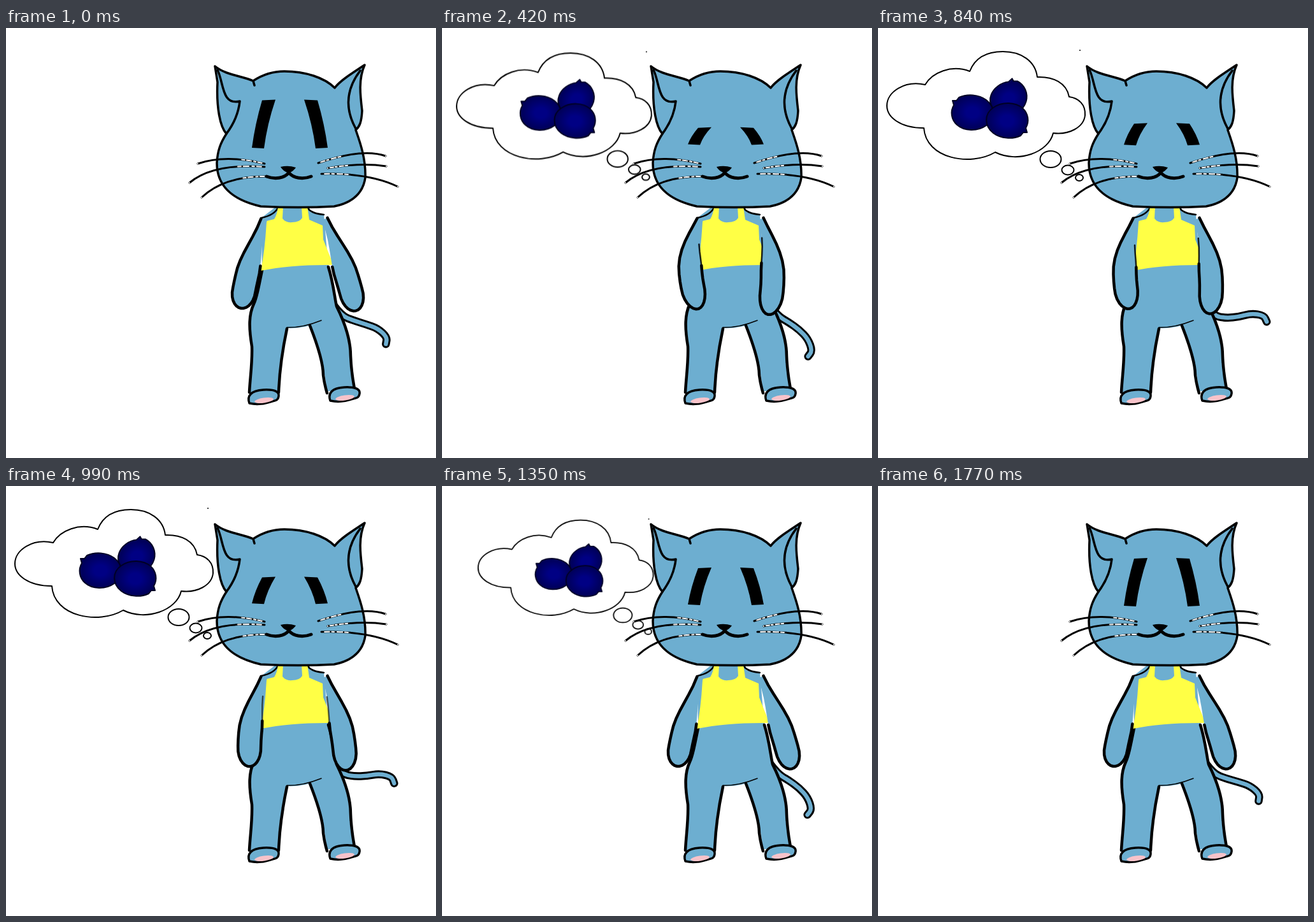
An HTML page that plays this animation: 675 px wide and 675 px high, repeating every 1800 ms.

```html
<!DOCTYPE html>
<html lang="en">
<head>
<meta charset="utf-8">
<title>Cat dreaming of berries</title>
<style>
  html, body { margin: 0; width: 100%; height: 100%; overflow: hidden; background: #fff; }
  svg { display: block; width: 100vw; height: 100vh; }
  path, ellipse { stroke-linecap: round; stroke-linejoin: round; }
  .fur { fill: #6daed0; }
  .line { fill: none; stroke: #000; stroke-width: 4.5; }
  .fine { stroke: #000; stroke-width: 3.5; }
  .thin { stroke-width: 2.5; }
  .cloud { fill: #fff; stroke: #000; stroke-width: 2; }
  .berry { fill: url(#navy); stroke: #000024; stroke-width: 2; }
  .gleam { fill: none; stroke: #fff; stroke-width: 2; stroke-dasharray: 0 66 4 3 7 4 3 3 6 4; }
  #bubble { transform-origin: 170px 122px; animation: think 1800ms linear infinite; }
  @keyframes think {
    0% { transform: translate(248px, 36px) scale(.35); }
    24%, 72.8% { transform: none; }
    92.2%, 100% { transform: translate(211px, 57px) scale(0); }
  }
</style>
</head>
<body>
<svg viewBox="0 0 675 675">
  <defs>
    <radialGradient id="navy">
      <stop offset=".3" stop-color="#000084"/>
      <stop offset="1" stop-color="#000056"/>
    </radialGradient>
    <path id="berry" d="M-29 -12L-31 -19L-25 -19L-21 -24C-8 -30 10 -29 22 -20C36 -9 37 10 22 20C8 30 -13 29 -24 19C-33 11 -35 -2 -29 -12Z"/>
    <g id="foot">
      <path class="fur fine" d="M382 589C378 578 384 569 404 568C424 567 429 572 428 578C427 584 424 585 418 586C405 590 395 592 382 589Z"/>
      <ellipse fill="#f8c3ca" cx="405" cy="584.5" rx="15" ry="4" transform="rotate(-8 405 584)"/>
    </g>
    <g id="whiskers">
      <path pathLength="100" d="M301 213Q345 198 406 213"/>
      <path pathLength="100" d="M288 243Q325 212 406 218"/>
      <path pathLength="100" d="M307 266Q343 232 410 233"/>
      <path pathLength="100" d="M596 201Q560 188 490 212"/>
      <path pathLength="100" d="M597 217Q555 211 505 220"/>
      <path pathLength="100" d="M615 249Q570 227 495 229"/>
    </g>
  </defs>

  <g id="bubble">
    <path class="cloud" d="M72 157C35 157 14 140 14 122C14 100 42 82 74 89C85 70 115 57 144 68C153 45 173 37 196 37C225 37 247 52 250 77C275 76 296 86 300 108C315 110 326 120 325 137C323 156 300 168 275 165C268 195 220 213 184 195C145 218 75 205 72 157Z"/>
    <ellipse class="cloud" cx="271" cy="206" rx="16.5" ry="13"/>
    <ellipse class="cloud" cx="298" cy="223" rx="9.5" ry="7.5"/>
    <ellipse class="cloud" cx="316" cy="235" rx="6" ry="5"/>
    <use href="#berry" class="berry" transform="translate(205 111) rotate(60) scale(.8 1.08)"/>
    <use href="#berry" class="berry" transform="translate(148 133)"/>
    <use href="#berry" class="berry" transform="translate(203 145) rotate(180)"/>
    <circle cx="317" cy="35" r="1"/>
  </g>

  <path id="tailEdge" class="line" style="stroke-width:12.5"/>
  <path id="tailFur" class="line" style="stroke:#6daed0;stroke-width:6.5"/>

  <!-- trunk and legs -->
  <path class="fur" d="M427 278H475L478 289L499 293L506 375C514 400 516 425 519 437C528 455 541 485 541 515C542 540 545 555 547 570H504C499 530 492 500 477 467Q460 472 441 471C434 505 429 545 428 574H382C383 550 387 525 386 500C381 470 381 450 389 433L402 380L401 298Z"/>
  <path class="line" d="M402 380C396 410 393 425 389 433C381 450 381 470 386 500C387 525 383 550 382 572M441 472C434 505 429 545 428 572M506 375C514 400 516 425 519 437C528 455 541 485 541 515C542 540 545 555 547 566M477 467C488 495 498 525 498 545Q500 560 504 573"/>
  <path class="line thin" d="M427 282Q421 294 401 298M474 283Q479 291 499 293"/>
  <path class="line" style="stroke-width:1.5" d="M441 470Q465 471 495 459"/>
  <use href="#foot"/>
  <use href="#foot" x="127" y="-4"/>

  <path fill="#ffff45" d="M427 280H435L434 299Q439 306 449 305Q461 305 465 298L464 280H473L476 301L497 310L498 332L514 372Q450 371 400 381Q407 345 409 303L421 300Q426 292 427 280Z"/>

  <g id="arms"></g>

  <!-- head -->
  <path class="fur fine" d="M388 83C403 73 420 68 437 68C470 68 500 78 516 94C525 82 545 70 563 58C553 80 556 105 559 130C558 148 555 155 549 160C556 180 565 205 564 235C560 262 540 275 515 280Q460 283 400 280C365 272 331 255 331 212C332 192 337 180 346 166C336 155 330 125 332 85L328 60C345 74 370 75 388 83Z"/>
  <path class="line fine" d="M388 83L390 90M332 66C342 85 338 122 367 115Q364 142 346 166M556 67C540 88 527 118 549 158"/>

  <use href="#whiskers" class="line fine" style="stroke-width:3"/>
  <use href="#whiskers" class="gleam"/>
  <path d="M431 218Q443 215 455 219Q452 224 444 228Q435 225 431 218Z"/>
  <path class="line" style="stroke-width:5" d="M409 233C422 238 437 236 444 227C451 236 466 238 479 233"/>
  <path id="eye"/>
  <use href="#eye" transform="translate(891) scale(-1 1)"/>
</svg>

<script>
const LOOP = 1800, DROWSY = 570, REACH = 585, WAG = 1175;
const $ = id => document.getElementById(id);
const mix = (a, b, k) => a + (b - a) * k;
const smooth = k => k * k * (3 - 2 * k);
const line = pts => 'M' + pts.join('L');

function add(parent, cls) {
  const path = document.createElementNS('http://www.w3.org/2000/svg', 'path');
  path.setAttribute('class', cls);
  parent.append(path);
  return path;
}

// a chain of links that bends more towards the tip
function drawTail(swing) {
  const rest = [53, 21, 17, 19, 43, 100];
  let x = 515, y = 436, d = `M${x} ${y}`;
  rest.forEach((deg, i) => {
    const a = (deg + swing * 35 * Math.min(1, i / 3)) * Math.PI / 180;
    const size = i < 5 ? 20 : 11;
    const nx = x + size * Math.cos(a), ny = y + size * Math.sin(a);
    d += i ? `Q${x} ${y} ${(x + nx) / 2} ${(y + ny) / 2}` : '';
    [x, y] = [nx, ny];
  });
  d += `L${x} ${y}`;
  $('tailEdge').setAttribute('d', d);
  $('tailFur').setAttribute('d', d);
}

// side: which way the outer edge faces; elbow and hand go from hanging to reaching
const arms = [
  { side: 1, shoulder: [405, 301], elbow: [[379, 387], [394, 377]], hand: [[369, 440], [416, 441]] },
  { side: -1, shoulder: [500, 300], elbow: [[534, 388], [513, 386]], hand: [[549, 444], [497, 452]] }
];
for (const arm of arms) {
  arm.fur = add($('arms'), 'fur');
  arm.inner = add($('arms'), 'line thin');
  arm.outer = add($('arms'), 'line');
}

function drawArm(arm, reach) {
  const STEPS = 16, BEND = .6;
  const S = arm.shoulder;
  const [E, H] = [arm.elbow, arm.hand].map(([a, b]) => a.map((v, j) => mix(v, b[j], reach)));
  // quadratic that passes through the elbow at BEND
  const C = E.map((v, j) => (v - (1 - BEND) ** 2 * S[j] - BEND ** 2 * H[j]) / (2 * BEND * (1 - BEND)));
  const edge = (i, side) => {
    const u = Math.sin(i / STEPS * Math.PI / 2);
    const [x, y] = S.map((v, j) => mix(mix(v, C[j], u), mix(C[j], H[j], u), u));
    const [dx, dy] = S.map((v, j) => mix(C[j] - v, H[j] - C[j], u));
    const tip = Math.max(0, (u - .8) / .2);
    const w = side * mix(5, 18, smooth(Math.min(1, u / BEND))) * Math.sqrt(Math.max(0, 1 - tip * tip)) / Math.hypot(dx, dy);
    return [x - dy * w, y + dx * w];
  };
  const outer = [], inner = [];
  for (let i = 0; i <= STEPS; i++) {
    outer.push(edge(i, arm.side));
    inner.unshift(edge(STEPS - (STEPS - i), -arm.side));
  }
  const hem = inner.findIndex(p => p[1] < 378);
  arm.fur.setAttribute('d', line([...outer, ...inner]));
  arm.outer.setAttribute('d', line([...outer, ...inner.slice(0, hem + 1)]));
  arm.inner.setAttribute('d', line(inner.slice(hem, hem + 4)));
  arm.inner.style.opacity = Math.min(.85, reach * 2);
}

function drawEye(open) {
  const top = mix(168, 113, open), low = mix(181, 188, open), mid = (top + low) / 2;
  $('eye').setAttribute('d',
    `M402 ${top}L423 ${top - 1}Q410 ${mid} 405 ${low + 1}L386 ${low}Q391 ${mid} 402 ${top}Z`);
}

function draw(t) {
  drawTail(Math.sin(2 * Math.PI * t / WAG));
  const reach = Math.max(0, 1 - Math.abs(t - REACH) / REACH);
  for (const arm of arms) drawArm(arm, reach);
  const ease = k => k ** .75;
  drawEye(t < DROWSY ? 1 - ease(t / DROWSY) : ease((t - DROWSY) / (LOOP - DROWSY)));
}

const start = performance.now();
function tick() {
  draw((performance.now() - start) % LOOP);
  requestAnimationFrame(tick);
}
tick();
</script>
</body>
</html>
```
